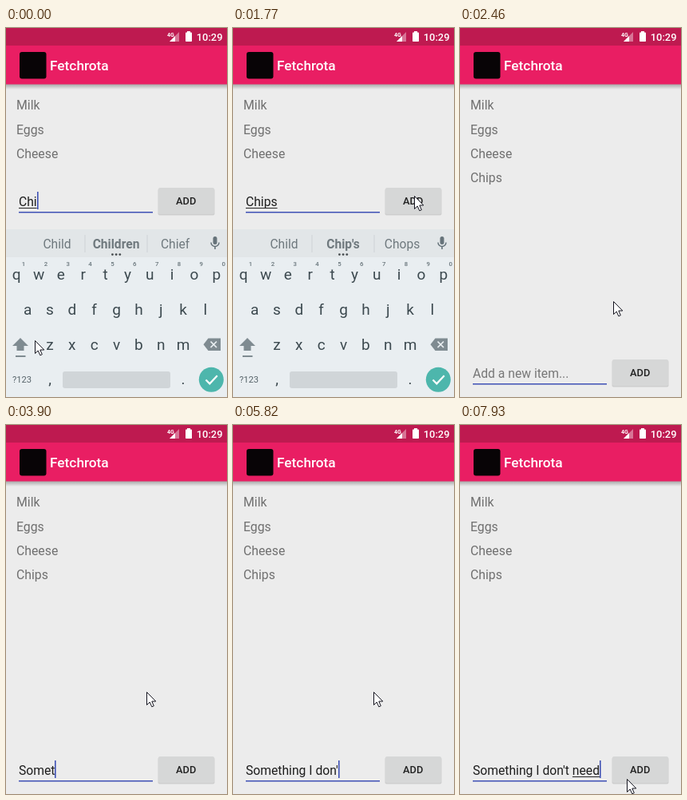
Recreate the animation shown at these times as an HTML page with a canvas. Size 277 by 462 pixels, loop 8 s.

```html
<!DOCTYPE html>
<html lang="en">
<head>
<meta charset="utf-8">
<title>Shopping list</title>
<style>
html, body { margin: 0; width: 277px; height: 462px; overflow: hidden; background: #ececec; }
canvas { display: block; }
</style>
</head>
<body>
<canvas id="stage" width="277" height="462"></canvas>
<script>
const LOOP = 8000, TICK = 136, BLINK = 490;
const ctx = document.getElementById('stage').getContext('2d');
const FONT = 'Roboto, "Open Sans", sans-serif';

const PRESSED = 1920, ADDED = 2050, RESIZED = 2190, KEYS_GONE = 2320;
const SENTENCE = "Something I don't need";

// Bursts of typing at an even pace
const WORD_KEYS = [{ from: 150, pace: 130, count: 2 }];
const SENTENCE_KEYS = [
  { from: 3200, pace: 148, count: 15 },
  { from: 5820, pace: 135, count: 3 },
  { from: 6370, pace: 190, count: 4 }
];

// Pointer stops: tick, x, y
const STOPS = [
  [4, 36, 391], [6, 0, 436], [7, 64, 405], [13, 227, 210], [15, 227, 210],
  [18, 192, 342], [20, 176, 334], [53, 176, 334], [54, 104, 445],
  [55, 104, 480], [57, 209, 480], [58, 209, 443]
];

const pressed = (b, t) =>
  t < b.from ? 0 : Math.min(b.count, 1 + Math.floor((t - b.from) / b.pace));
const typed = (bursts, t) => bursts.reduce((n, b) => n + pressed(b, t), 0);

function rect(x, y, w, h, color, r = 0) {
  ctx.fillStyle = color;
  ctx.beginPath();
  ctx.roundRect(x, y, w, h, r);
  ctx.fill();
}

function text(str, x, y, size, color, weight = 400, align = 'left') {
  ctx.font = `${weight} ${size}px ${FONT}`;
  ctx.textAlign = align;
  ctx.fillStyle = color;
  ctx.fillText(str, x, y);
}

function poly(points, fill, stroke, width = 1) {
  ctx.beginPath();
  points.forEach(([x, y]) => ctx.lineTo(x, y));
  if (fill) {
    ctx.closePath();
    ctx.fillStyle = fill;
    ctx.fill();
  }
  if (stroke) {
    ctx.strokeStyle = stroke;
    ctx.lineWidth = width;
    ctx.stroke();
  }
}

function drawHeader() {
  const shade = ctx.createLinearGradient(0, 70, 0, 77);
  shade.addColorStop(0, 'rgba(0,0,0,.3)');
  shade.addColorStop(1, 'rgba(0,0,0,0)');
  rect(0, 70, 277, 7, shade);
  rect(0, 21, 277, 49.6, '#e91e63');
  rect(0, 0, 277, 22, '#be1a50');

  text('4G', 202, 10.5, 7, '#fff', 700);
  poly([[217, 5], [217, 17], [205, 17]], 'rgba(255,255,255,.4)');
  poly([[212, 10], [212, 17], [205, 17]], '#fff');
  rect(225, 5.5, 8, 11.5, '#fff', 0.8);
  rect(227, 4, 4, 2, '#fff');
  text('10:29', 271.5, 16, 12.9, '#fff', 500, 'right');

  rect(17, 30, 33.5, 33.5, '#080406', 3);
  text('Fetchrota', 55, 53, 17.3, '#fff', 500);
}

function drawList(t) {
  const items = ['Milk', 'Eggs', 'Cheese'];
  if (t >= ADDED) items.push('Chips');
  items.forEach((item, i) => text(item, 13, Math.round(102.4 + i * 30.3), 15.8, '#707070'));
}

function fieldText(t) {
  return t < ADDED
    ? 'Chips'.slice(0, 3 + typed(WORD_KEYS, t))
    : SENTENCE.slice(0, typed(SENTENCE_KEYS, t));
}

// The word being composed is underlined while the keyboard tracks it.
function composing(str, t) {
  if (t >= ADDED && t < 4290) return '';
  const word = (str.match(/\S+$/) || [''])[0];
  return word.includes("'") ? '' : word;
}

// Every key press or click restarts the blink.
function caretOn(t) {
  let last = t >= PRESSED ? PRESSED : 0;
  for (const b of [...WORD_KEYS, ...SENTENCE_KEYS]) {
    const n = pressed(b, t);
    if (n) last = Math.max(last, b.from + (n - 1) * b.pace);
  }
  return (t - last) % (2 * BLINK) < BLINK;
}

function drawField(t) {
  const str = fieldText(t);
  ctx.save();
  ctx.translate(0, t < RESIZED ? 0 : 215);
  text(str || 'Add a new item...', 16, 223, 15.7, str ? '#1e1e1e' : '#777');

  const width = ctx.measureText(str).width;
  const word = composing(str, t);
  if (word) {
    const w = ctx.measureText(word).width;
    rect(16 + width - w, 225, w, 1, '#222');
  }
  if (caretOn(t)) rect(Math.round(16 + width), 205, 1.6, 22, '#3f51b5');
  rect(16, 230, 168, 1.5, '#3f51b5');

  const down = t >= PRESSED && t < RESIZED;
  rect(190.5, 201, 71, 33.5, 'rgba(0,0,0,.13)', 2);
  rect(191, 200, 70, 33, down ? '#c4c5c5' : '#d6d7d7', 2);
  text('ADD', 225.7, 221, 12.8, '#222', 500, 'center');
  ctx.restore();
}

function suggestions(str) {
  if (str === 'Chi') return ['Child', 'Children', 'Chief'];
  if (str === 'Chip') return ['Child', 'Chip', 'Chips'];
  return ['Child', "Chip's", 'Chops'];
}

function drawSuggestions(t) {
  rect(0, 252, 277, 35, '#e2e6e8');
  suggestions('Chips'.slice(0, 3 + typed(WORD_KEYS, t))).forEach((word, i) => {
    text(word, 64 + 74 * i, 276, 15.6, '#6f797e', i === 1 ? 700 : 400, 'center');
    if (i) rect(20.5 + 78 * i, 259, 1, 22, '#cdd2d5');
    rect(132 + 4.7 * i, 282.2, 2.8, 2.8, '#454b4e', 1.4);
  });

  const grey = '#66737a';
  rect(259.5, 261, 5, 10, grey, 2.5);
  ctx.strokeStyle = grey;
  ctx.lineWidth = 1.5;
  ctx.beginPath();
  ctx.arc(262, 268.5, 5, 0, Math.PI);
  ctx.stroke();
  rect(261.2, 273, 1.6, 4, grey);
}

function drawKeyboard(t) {
  const ink = '#3c494f', grey = '#7f8b91', step = 27.85;
  rect(0, 252, 277, 210, '#e9eef1');
  drawSuggestions(t);

  ['qwertyuiop', 'asdfghjkl', 'zxcvbnm'].forEach((row, r) => {
    const x = 13.2 + [0, 0.5, 1.5][r] * step;
    [...row].forEach((key, i) => text(key, x + i * step, 315 + 44 * r, 19, ink, 400, 'center'));
  });
  for (let i = 0; i < 10; i++) {
    text((i + 1) % 10, 22 + i * step, 298, 7.8, '#68757b', 500, 'center');
  }

  poly([[18, 388], [28, 398], [22.5, 398], [22.5, 404], [13.5, 404], [13.5, 398], [8, 398]], grey);
  rect(12, 410, 12.5, 2, grey);

  poly([[247.5, 396.3], [253.5, 388.5], [269, 388.5], [269, 404], [253.5, 404]], grey);
  poly([[256.5, 392.5], [264, 400]], null, '#e9eef1', 1.7);
  poly([[264, 392.5], [256.5, 400]], null, '#e9eef1', 1.7);

  text('?123', 20, 444, 11.2, '#57646a', 400, 'center');
  text(',', 55, 446, 19, ink, 400, 'center');
  text('.', 222, 446, 19, ink, 400, 'center');
  rect(71, 430, 135, 21, '#d0d5d8', 3);

  rect(241.8, 424.8, 31, 31, '#4db6ac', 15.5);
  poly([[250.5, 440.5], [255.3, 445.3], [264.8, 435.3]], null, '#fff', 2.2);
}

// Position is sampled once per tick and eased between stops.
function pointerAt(t) {
  const tick = Math.floor(t / TICK);
  const next = STOPS.findIndex(s => s[0] > tick);
  if (next === 0) return STOPS[0].slice(1);
  if (next < 0) return STOPS[STOPS.length - 1].slice(1);
  const [t0, x0, y0] = STOPS[next - 1], [t1, x1, y1] = STOPS[next];
  const p = (tick - t0) / (t1 - t0);
  const ease = p * p * (3 - 2 * p);
  return [x0 + (x1 - x0) * ease, y0 + (y1 - y0) * ease];
}

function drawPointer(t) {
  const [x, y] = pointerAt(t);
  ctx.save();
  ctx.translate(Math.round(x) + 0.5, Math.round(y) + 0.5);
  poly([[0, 0], [0, 16], [3.7, 12.5], [6.3, 18.3], [8.8, 17.2], [6.3, 11.5], [11.3, 11.5], [0, 0]], '#fff', '#14141f');
  ctx.restore();
}

function draw(t) {
  rect(0, 0, 277, 462, '#ececec');
  drawHeader();
  drawList(t);
  drawField(t);
  if (t < KEYS_GONE) {
    ctx.save();
    if (t >= RESIZED) {
      ctx.globalAlpha = 0.6;
      ctx.translate(0, 60);
    }
    drawKeyboard(t);
    ctx.restore();
  }
  drawPointer(t);
}

const start = performance.now();
function frame() {
  draw((performance.now() - start) % LOOP);
  requestAnimationFrame(frame);
}
frame();
</script>
</body>
</html>
```
